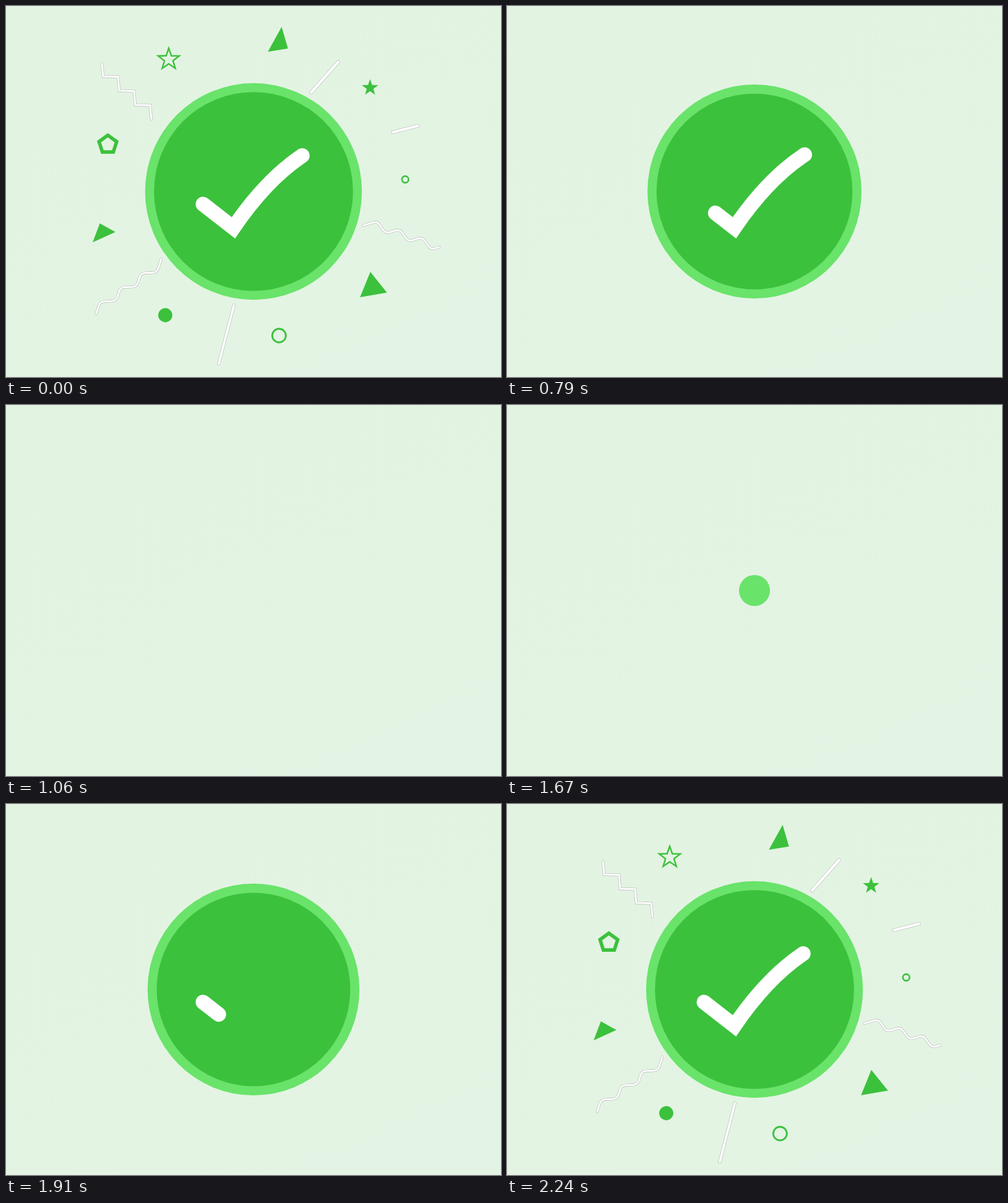
Write an HTML page that moves like this. It is 800 px wide and 600 px high and loops after 2.27 s.

```html
<!DOCTYPE html>
<html lang="en">
<head>
<meta charset="utf-8">
<title>Success check</title>
<style>
html, body { margin: 0; width: 100%; height: 100%; overflow: hidden; background: #e3f4e2; }
svg { display: block; width: 800px; height: 600px; }
</style>
</head>
<body>
<svg id="stage" viewBox="0 0 800 600">
  <defs>
    <linearGradient id="bg" x2="0.6" y2="1">
      <stop offset="0" stop-color="#e2f3e1"/>
      <stop offset="1" stop-color="#e4f4e4"/>
    </linearGradient>
  </defs>
  <rect width="800" height="600" fill="url(#bg)"/>
</svg>
<script>
const LOOP = 2270, FRAME = LOOP / 75;
const GREEN = '#3cc13c', LIGHT = '#69e36a';
const stage = document.getElementById('stage');

function add(tag, attrs) {
  const el = document.createElementNS('http://www.w3.org/2000/svg', tag);
  for (const k in attrs) el.setAttribute(k, attrs[k]);
  stage.appendChild(el);
  return el;
}

const part = (t, start, length) => Math.min(1, Math.max(0, (t - start) / length));
const smooth = x => x * x * (3 - 2 * x);
const quadOut = x => 1 - (1 - x) ** 2;
const sineOut = x => Math.sin(x * Math.PI / 2);

const stroke = (color, width) => ({
  fill: 'none', stroke: color, 'stroke-width': width, 'stroke-miterlimit': 10
});

function show(el, on) {
  el.style.display = on ? '' : 'none';
}

// Show only the stretch from a to b of a path of length 1
function trim(el, a, b) {
  show(el, b - a > 0.001);
  el.setAttribute('stroke-dasharray', `${b - a} 3`);
  el.setAttribute('stroke-dashoffset', -a);
}

// Relative path of legs that alternate between the steps a and b,
// with corners rounded by the share `round` of a leg
function zigzag(x, y, a, b, legs, round, tail) {
  let d = `M${x} ${y}`;
  for (let i = 0; i < legs; i++) {
    const [p, q] = i % 2 ? [b, a] : [a, b];
    const last = i === legs - 1;
    const k = (last ? tail : 1 - round) - (i ? round : 0);
    d += `l${p[0] * k} ${p[1] * k}`;
    if (!last) {
      const [cx, cy] = p.map(v => v * round);
      d += `q${cx} ${cy} ${cx + q[0] * round} ${cy + q[1] * round}`;
    }
  }
  return d;
}

const lines = [];

function line(d, width) {
  const base = { d, pathLength: 1, 'stroke-linecap': 'round' };
  lines.push(
    add('path', { ...base, ...stroke('#bfc4c2', width + 1.2) }),
    add('path', { ...base, ...stroke('#fff', width - 0.4) })
  );
}

line('M493 140l46.6 -52.7', 4.6);
line('M625.5 204l43 -11', 4.6);
line('M368.3 484l-26.1 101', 4);
line(zigzag(235, 183, [-2, -22.4], [-24, -0.6], 7, 0, 1.4), 3.2);
line(zigzag(251, 409, [-7, 22], [-26, 1], 7, 0.3, 1.35), 3.2);
line(zigzag(577, 355, [23, -7], [13.5, 20], 7, 0.3, 1), 3.2);

// Shapes scale about their centre and are staggered in the order of creation
const shapes = [];
const solid = { fill: GREEN };

function shape(tag, x, y, attrs) {
  shapes.push({ el: add(tag, attrs), x, y });
}

function triangle(x, y, points) {
  shape('polygon', x, y, { points, ...solid });
}

// Regular polygon, or a star when every second point is pulled in
function regular(x, y, count, size, pull, paint) {
  const points = Array.from({ length: count }, (_, i) => {
    const a = 2 * Math.PI * i / count - Math.PI / 2;
    const r = i % 2 ? size * pull : size;
    return [r * Math.cos(a), r * Math.sin(a)];
  }).join(' ');
  shape('polygon', x, y, { points, ...paint });
}

function dot(x, y, r, paint) {
  shape('circle', x, y, { r, ...paint });
}

triangle(441.5, 58.7, '4,-25 14.2,10 -18.3,15.3');
regular(263, 86.3, 10, 18, 0.4, stroke(GREEN, 2.4));
dot(441.3, 533, 11, stroke(GREEN, 2.8));
triangle(156.2, 366.5, '-4.5,-15 20.6,-0.9 -16.2,15.8');
triangle(592.2, 454.9, '-3.4,-24.9 23.5,8.7 -20,16.1');
dot(257.4, 500, 11.4, solid);
regular(164.6, 224, 5, 15, 1, stroke(GREEN, 5.6));
dot(645.2, 280.5, 5.4, stroke(GREEN, 2.6));
regular(588.4, 132.2, 10, 17.3, 0.4, solid);

const disc = { cx: 400, cy: 300 };
const outer = add('circle', { ...disc, fill: LIGHT });
const inner = add('circle', { ...disc, fill: GREEN });
const check = add('path', {
  d: 'M318.5 320.5L367.5 358.7Q421 280 481 240.5',
  pathLength: 1, 'stroke-linecap': 'round', ...stroke('#fff', 24)
});

// Pop up past the rest size, settle, later collapse
function radius(rest, peak, start, up, down) {
  const pop = peak * sineOut(part(up, start, 1965 - start));
  const settle = (peak - rest) * smooth(part(up, 1965, 510));
  return Math.max(0, (pop - settle) * (1 - part(down, 850, 205) ** 2));
}

function draw(time) {
  // Whole frames; the last and the first one are the same picture
  const t = Math.floor(((time + 6) % LOOP) / FRAME) * FRAME;
  const leaving = t < LOOP / 2;
  const down = leaving ? t : 0;
  const up = t === 0 ? LOOP - FRAME : leaving ? t + LOOP : t;

  const from = smooth(part(down, 30, 280));
  const to = quadOut(part(up, 2015, 300));
  for (const el of lines) trim(el, from, to);

  shapes.forEach(({ el, x, y }, i) => {
    const order = i / (shapes.length - 1);
    const grown = smooth(part(up, 1890 + 170 * order ** 3, 250));
    const gone = smooth(part(down, 340 + 200 * order ** 1.5, 190));
    const k = grown * (1 - gone);
    show(el, k > 0.001);
    el.setAttribute('transform', `translate(${x} ${y}) scale(${k})`);
  });

  outer.setAttribute('r', radius(173, 178, 1635, up, down));
  inner.setAttribute('r', radius(158.3, 164, 1665, up, down));
  trim(check, smooth(part(down, 735, 262)), quadOut(part(up, 1877, 408)));
}

const begin = performance.now();
function tick() {
  draw(performance.now() - begin);
  requestAnimationFrame(tick);
}
tick();
</script>
</body>
</html>
```
